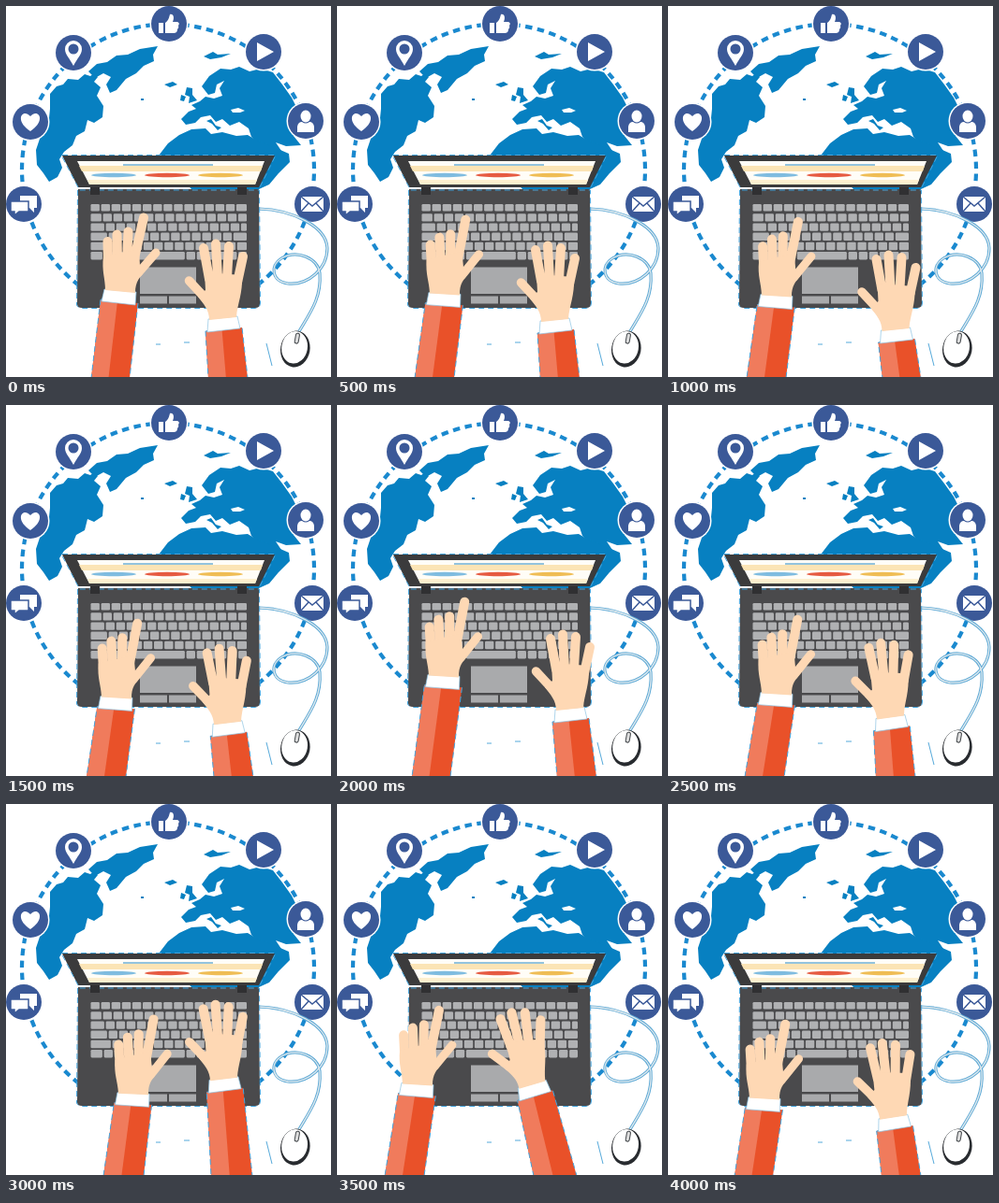
Write an HTML page that moves like this. It is 347 by 397 pixels and loops after 4500 ms.

```html
<!DOCTYPE html>
<html lang="en">
<head>
<meta charset="utf-8">
<title>Typing on a connected laptop</title>
<style>
html, body { margin: 0; width: 100%; height: 100%; overflow: hidden; background: #fff; }
svg { display: block; width: 100vw; height: 100vh; }
.land { fill: #0780c1; }
.ring { fill: none; stroke: #1a89cf; stroke-width: 4.2; stroke-dasharray: 7.5 5.5; }
.fringe { fill: none; stroke: #45a5de; stroke-width: 1; stroke-dasharray: 6 4; }
.icon { fill: #3b5998; }
.white { fill: #fff; }
.skin { fill: #fed8b4; }
.finger { fill: none; stroke: #fed8b4; stroke-linecap: round; }
</style>
</head>
<body>
<svg viewBox="0 0 347 397" preserveAspectRatio="none">
  <path class="ring" d="M78 299A156 156 0 1 1 268 299"/>

  <g class="land">
    <path d="M47 94L54 86 61 84 66 78 77 79 84 73 90 75 94 72 98 76 94 81 101 87 97 96 104 107 103 119 94 125 87 122 84 134 75 139 71 149 62 156 57 164 60 173 55 183 46 188 40 179 33 170 32 154 37 139 45 130 47 110Z"/>
    <path d="M88 70L97 62 108 60 118 53 130 52 143 46 162 43 157 52 158 59 147 64 139 72 128 78 118 90 111 93 107 84 112 76 104 72 95 77Z"/>
    <path d="M211 54L221 49 226 52 240 51 230 55 218 57Z"/>
    <path d="M169 84L178 81 183 84 175 87ZM144 99H147V101H144Z"/>
    <path d="M193 87L199 88 199 95 204 101 195 104 196 97 191 95ZM187 95L192 97 190 102 186 101Z"/>
    <path d="M209 86L217 75 229 67 240 68 249 65 260 70 272 67 285 71 295 84 305 98 310 108 305 126 307 139 315 149 299 150 288 146 296 158 286 166 272 150 262 140 259 131 249 124 239 128 231 121 224 124 218 117 208 119 202 125 192 127 187 121 195 113 203 110 198 106 207 102 213 97 222 99 231 96 228 88 233 80 225 84 223 93 216 95Z"/>
    <path d="M163 160L173 147 185 138 198 132 213 131 219 137 231 135 246 139 258 138 268 144 286 151 302 158 303 167 291 179 281 191 270 196 200 198Z"/>
    <path d="M219 121L224 128 230 130 226 133 220 126 214 123Z"/>
  </g>
  <path d="M240 111L248 109 255 112 250 114 242 114Z" fill="#fff"/>

  <g id="icons"></g>

  <g id="cable" fill="none" stroke-linecap="round"></g>
  <g transform="rotate(10 309 366)">
    <ellipse cx="309" cy="367" rx="15.7" ry="19.5" fill="#292c30"/>
    <ellipse cx="308" cy="365.5" rx="13.8" ry="17.3" fill="#fff"/>
    <rect x="307" y="350" width="4" height="11" rx="2" fill="#ddd" stroke="#44484c"/>
  </g>
  <path d="M278 361L284 385M160 362H165M190 360H196" fill="none" stroke="#55a9da"/>

  <path d="M60 160H287L270 194H77Z" fill="#3b3b3c"/>
  <path class="fringe" d="M77 194L59 159.5H288L271 194"/>
  <path d="M76 166H276L266 191H89Z" fill="#fffdf7"/>
  <path d="M78 171H274L272 177H81Z" fill="#fbe4b5"/>
  <path d="M87 186H268L266 191H89Z" fill="#fdf0cf"/>
  <path d="M125 170H221" stroke="#6fb0d6" stroke-width="1.5"/>
  <g id="charts"></g>
  <path d="M77 196H270L271 319Q271 323 266 323H81Q76 323 76 319Z" fill="#4a4a4c"/>
  <path class="fringe" d="M76.5 197L75.5 320Q77 323.5 82 323.5H266Q271 323.5 271.5 318L270.5 197Z"/>
  <path d="M90 194H100V202H90ZM247 194H257V202H247Z" fill="#303032"/>
  <g id="keys" fill="#b0b1b3"></g>
  <path d="M143 279.5H203V308H143ZM143 310.5H172V318.5H143ZM174 310.5H203V318.5H174Z" fill="#a9aaac"/>

  <g id="left">
    <polygon class="sleeve" fill="#e95129"/>
    <polygon class="shade" fill="#f07b5c"/>
    <polygon class="sleeve fringe"/>
    <g class="hand">
      <path d="M105 303L139 306 138 320 102 316Z" fill="#fff" stroke="#8dc3e2" stroke-width=".7"/>
      <path class="finger" stroke-width="10" d="M108.5 252L109 274M118.5 244.5L119 272M130.5 241.5L129 272M147 226.5L137 270"/>
      <path class="finger" stroke-width="9" d="M160 264L141 286"/>
      <path class="skin" d="M104 268L142 260 143 278 149 282C143 291 138 294 138 307L106 304C106 291 102 284 104 268Z"/>
    </g>
  </g>
  <g id="right">
    <polygon class="sleeve" fill="#e95129"/>
    <polygon class="shade" fill="#f07b5c"/>
    <polygon class="sleeve fringe"/>
    <g class="hand">
      <path d="M216 335L247 332 250 345 215 349Z" fill="#fff" stroke="#8dc3e2" stroke-width=".7"/>
      <path class="finger" stroke-width="10" d="M211 259L217 292M224 254.5L226 290M238 257L236 290M253 268L247 296"/>
      <path class="finger" stroke-width="9.5" d="M195.5 294L214 314"/>
      <path class="skin" d="M212 285L252 288C253 308 247 318 246 333L217 336C217 325 211 319 205 311L213 304Z"/>
    </g>
  </g>
</svg>
<script>
const $ = id => document.getElementById(id);

const badges = [
  [174, 19, '<path d="M-11-1H-6V10H-11ZM-4-1C0-4 0-7 1-10C5-11 6-6 4-2H9Q12-1 10 2Q11 4 9 6Q9 10 5 10H-4Z"/>'],
  [275, 49, '<path d="M-7-10L11 0L-7 10Z"/>'],
  [320, 123, '<ellipse cy="-5" rx="5.5" ry="6.5"/><path d="M-9 12V6Q-8 1-4 1Q0 4 4 1Q8 1 9 6V12Z"/>'],
  [327, 212, '<path d="M-12-8H12V8H-12Z"/><path d="M-12-8L0 2L12-8M-12 8L-4-1M12 8L4-1" fill="none" stroke="#3b5998" stroke-width="1.5"/>'],
  [19, 212, '<path d="M-4-9H14V4H11V9L6 4H-4Z"/><path d="M-14-3H5V8H-5L-10 12V8H-14Z" stroke="#3b5998" stroke-width="1.5"/>'],
  [26, 124, '<path d="M0 10C-18-2-8-15 0-6C8-15 18-2 0 10Z"/>'],
  [72, 50, '<path d="M0 14C-4 6-9 2-9-4A9 9 0 0 1 9-4C9 2 4 6 0 14Z"/><circle cy="-4" r="5.5" class="icon"/>']
];
$('icons').innerHTML = badges.map(([x, y, art]) =>
  `<g transform="translate(${x} ${y})" class="white"><circle r="20.5"/><circle r="19" class="icon"/>${art}</g>`).join('');

const wire = 'M270 217C306 218 342 236 343 259C343 281 323 299 301 297C284 295 281 278 294 270C311 260 333 270 335 286C337 312 325 328 313 348';
$('cable').innerHTML = [['#5da9d5', 3.2], ['#e3ebef', 1.3]].map(([color, width]) =>
  `<path d="${wire}" stroke="${color}" stroke-width="${width}"/>`).join('');

$('charts').innerHTML = ['#7fbce0', '#e65b42', '#efbd55'].map((color, i) =>
  `<ellipse cx="${115 + i * 57}" cy="181" rx="24" ry="2.2" fill="${color}"/>`).join('');

// Staggered rows: the first key is widened, the last one fills the row.
let keys = '';
const key = (x, y, w, h) => keys += `<rect x="${x}" y="${y}" width="${w}" height="${h}" rx="1.3"/>`;
[0, 2, 5, 8, 12, 3].forEach((extra, row) => {
  const y = 212 + row * 10.2, end = 257;
  let x = 90.5, col = 0;
  while (x < end - 5) {
    let w = 9.4 + (col === 0 ? extra : 0);
    if (row === 5 && col === 4) w = 53;
    if (x + w > end - 7) w = end - x;
    key(x, y, w, row ? 8.4 : 7.5);
    x += w + 1.7;
    col++;
  }
});
$('keys').innerHTML = keys;

// Each pose: shift x, shift y, turn, sleeve hem left and right.
const arms = [
  { el: $('left'), pivot: [121, 305], cuff: [[101, 314], [141, 318]], poses: [
    [0, 0, 0, 91, 132], [-7, 3, -2, 83, 125], [-6, 5, -1.5, 84, 126],
    [-4, 8, -2, 86, 128], [-8, -15, -2, 80, 121], [-6, 4, -2, 82, 124],
    [14, 5, -2.5, 104, 147], [-36, -5, -1.5, 51, 93], [-19, 10, -2, 71, 112]] },
  { el: $('right'), pivot: [232, 335], cuff: [[213, 348], [252, 344]], poses: [
    [0, 0, 0, 216, 258], [1, 2, 0, 217, 259], [11.5, 12, 0, 229, 270],
    [5, 6, -1, 222, 264], [17, -9, 0, 235, 277], [6, 0, -2, 222, 264],
    [1, -40, -1, 219, 263], [-23, -34, -10.5, 210, 256], [9, 1, -3, 228, 270]] }
];
const lit = .45;

const mix = (a, b, k) => [a[0] + (b[0] - a[0]) * k, a[1] + (b[1] - a[1]) * k];

function place(arm, step) {
  const [dx, dy, turn, hemL, hemR] = arm.poses[step];
  const [px, py] = arm.pivot;
  const a = turn * Math.PI / 180, c = Math.cos(a), s = Math.sin(a);
  const [tl, tr] = arm.cuff.map(([x, y]) =>
    [px + dx + (x - px) * c - (y - py) * s, py + dy + (x - px) * s + (y - py) * c]);
  const bl = [hemL, 398], br = [hemR, 398];
  arm.el.querySelectorAll('.sleeve').forEach(p => p.setAttribute('points', [tl, tr, br, bl].join(' ')));
  arm.el.querySelector('.shade').setAttribute('points',
    [tl, mix(tl, tr, lit), mix(bl, br, lit), bl].join(' '));
  arm.el.querySelector('.hand').setAttribute('transform', `translate(${dx} ${dy}) rotate(${turn} ${px} ${py})`);
}

const start = performance.now();
let shown = -1;
function draw() {
  const step = Math.floor((performance.now() - start) % 4500 / 500);
  if (step !== shown) {
    shown = step;
    arms.forEach(arm => place(arm, step));
  }
  requestAnimationFrame(draw);
}
draw();
</script>
</body>
</html>
```
